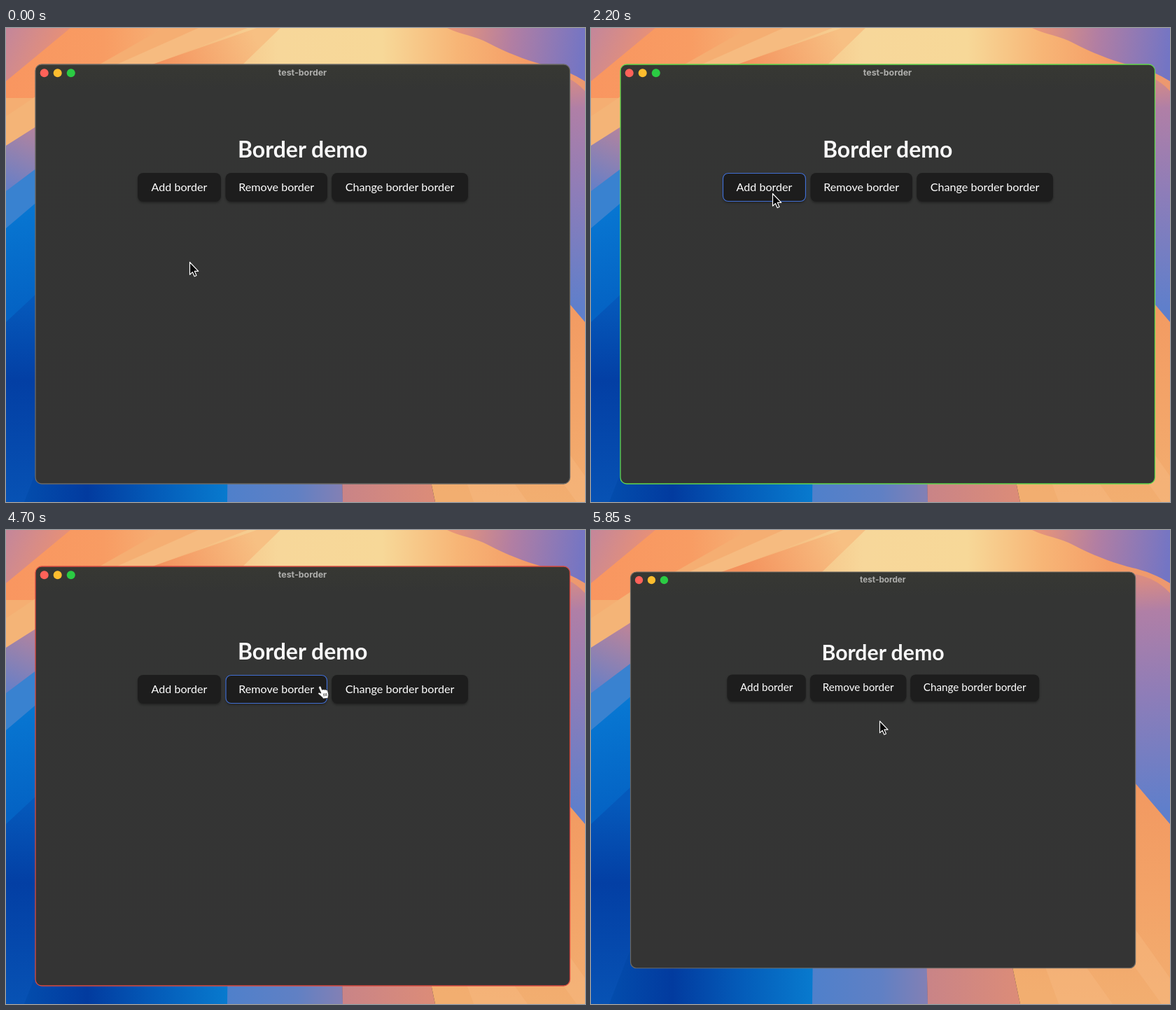
Write an HTML page that moves like this. It is 827 px wide and 677 px high and loops after 6 s.

```html
<!DOCTYPE html>
<html lang="en">
<head>
<meta charset="utf-8">
<title>Border demo</title>
<style>
  html, body { margin: 0; width: 100%; height: 100%; overflow: hidden; background: #343434; }
  svg { display: block; width: 827px; height: 677px; }
  text { fill: #fff; text-anchor: middle; }
  .title { font: 700 12.4px Inter, sans-serif; fill: #aeaeac; }
  .heading { font: 700 32px Lato, sans-serif; fill: #f9f9f9; }
  .label { font: 400 16.1px Lato, sans-serif; }
  .ring { fill: none; stroke: #426fd3; stroke-width: 1.2; }
  .shade { filter: drop-shadow(0 2px 1.5px rgba(0, 0, 0, .3)); }
</style>
</head>
<body>
<svg viewBox="0 0 827 677" xmlns="http://www.w3.org/2000/svg">
  <defs>
    <linearGradient id="sky" gradientUnits="userSpaceOnUse" x1="0" y1="0" x2="827" y2="0">
      <stop offset="0" stop-color="#f99660"/>
      <stop offset=".17" stop-color="#f89c63"/>
      <stop offset=".3" stop-color="#f5b579"/>
      <stop offset=".47" stop-color="#f7d79a"/>
      <stop offset=".65" stop-color="#f7d898"/>
      <stop offset=".78" stop-color="#f7b576"/>
      <stop offset=".9" stop-color="#f49c66"/>
      <stop offset="1" stop-color="#ec9870"/>
    </linearGradient>
    <linearGradient id="corner" gradientUnits="userSpaceOnUse" x1="0" y1="10" x2="85" y2="50">
      <stop offset="0" stop-color="#c58799"/>
      <stop offset="1" stop-color="#ee9270"/>
    </linearGradient>
    <linearGradient id="wedge" gradientUnits="userSpaceOnUse" x1="220" y1="60" x2="350" y2="0">
      <stop offset="0" stop-color="#f4925d"/>
      <stop offset="1" stop-color="#f7c083"/>
    </linearGradient>
    <linearGradient id="dusk" gradientUnits="userSpaceOnUse" x1="640" y1="0" x2="827" y2="25">
      <stop offset="0" stop-color="#e79579"/>
      <stop offset=".45" stop-color="#b17ea3"/>
      <stop offset="1" stop-color="#7375c4"/>
    </linearGradient>
    <linearGradient id="east" gradientUnits="userSpaceOnUse" x1="790" y1="70" x2="815" y2="400">
      <stop offset="0" stop-color="#d98c83"/>
      <stop offset=".14" stop-color="#b07fa6"/>
      <stop offset=".5" stop-color="#8e7db8"/>
      <stop offset="1" stop-color="#5f7fcb"/>
    </linearGradient>
    <linearGradient id="mauve" gradientUnits="userSpaceOnUse" x1="50" y1="140" x2="10" y2="230">
      <stop offset="0" stop-color="#b9849b"/>
      <stop offset="1" stop-color="#687fc6"/>
    </linearGradient>
    <linearGradient id="azure" gradientUnits="userSpaceOnUse" x1="0" y1="250" x2="30" y2="400">
      <stop offset="0" stop-color="#0878d3"/>
      <stop offset="1" stop-color="#0463c4"/>
    </linearGradient>
    <linearGradient id="deep" gradientUnits="userSpaceOnUse" x1="0" y1="390" x2="0" y2="677">
      <stop offset="0" stop-color="#0559bb"/>
      <stop offset=".4" stop-color="#033fa4"/>
      <stop offset="1" stop-color="#0752b4"/>
    </linearGradient>
    <linearGradient id="sea" gradientUnits="userSpaceOnUse" x1="30" y1="0" x2="316" y2="0">
      <stop offset="0" stop-color="#034cac"/>
      <stop offset=".3" stop-color="#023b9f"/>
      <stop offset=".65" stop-color="#045cb9"/>
      <stop offset="1" stop-color="#087ace"/>
    </linearGradient>
    <linearGradient id="iris" gradientUnits="userSpaceOnUse" x1="316" y1="0" x2="481" y2="0">
      <stop offset="0" stop-color="#4f80cb"/>
      <stop offset=".6" stop-color="#6080c4"/>
      <stop offset="1" stop-color="#8380b4"/>
    </linearGradient>
    <linearGradient id="rose" gradientUnits="userSpaceOnUse" x1="481" y1="0" x2="613" y2="0">
      <stop offset="0" stop-color="#c98487"/>
      <stop offset="1" stop-color="#dc8c78"/>
    </linearGradient>
    <linearGradient id="sand" gradientUnits="userSpaceOnUse" x1="810" y1="370" x2="780" y2="677">
      <stop offset="0" stop-color="#f29961"/>
      <stop offset=".5" stop-color="#f3a368"/>
      <stop offset="1" stop-color="#f2ae70"/>
    </linearGradient>
    <linearGradient id="face" x1="0" y1="0" x2="0" y2="1">
      <stop offset="0" stop-color="#373833"/>
      <stop offset=".06" stop-color="#343534"/>
      <stop offset="1" stop-color="#343434"/>
    </linearGradient>
  </defs>

  <g id="wallpaper">
    <rect width="827" height="200" fill="url(#sky)"/>
    <path fill="url(#corner)" d="M0 0H92L0 76Z"/>
    <path fill="#f5ae72" d="M225 0H300L120 100H0V128Z"/>
    <path fill="#f6bb80" d="M275 0H345L190 60H140Z"/>
    <path fill="url(#wedge)" d="M358 0L186 60H330L392 0Z"/>
    <path fill="#f4b477" d="M0 126L57 88V140L0 172Z"/>
    <path fill="url(#dusk)" d="M630 0C650 10 668 10 690 22C720 38 755 50 778 55Q805 62 827 76V0Z"/>
    <path fill="url(#east)" d="M770 62Q805 66 827 90V430H770Z"/>
    <path fill="url(#mauve)" d="M0 168L60 130V210L0 240Z"/>
    <path fill="#3982d0" d="M0 233L60 188V250L0 290Z"/>
    <path fill="url(#azure)" d="M0 286L60 235V400L0 430Z"/>
    <path fill="url(#deep)" d="M0 420L60 364V677H0Z"/>
    <path fill="url(#sea)" d="M56 600H317V677H26Z"/>
    <path fill="url(#iris)" d="M317 600H480L481 677H316Z"/>
    <path fill="url(#rose)" d="M479 600H597L613 677H481Z"/>
    <path fill="url(#sand)" d="M770 353L827 420V677H613L597 600H770Z"/>
    <path fill="#f5b981" opacity=".45" d="M640 600H690L745 677H668ZM770 560L827 640V677H815L770 615Z"/>
  </g>

  <g id="window">
    <rect id="frame" x="42" y="52" width="763.5" height="599" rx="9" fill="url(#face)" stroke-width="1.3"/>
    <circle cx="54.7" cy="64.2" r="6" fill="#ff6259"/>
    <circle cx="73.7" cy="64.2" r="6" fill="#fdbd2e"/>
    <circle cx="92.8" cy="64.2" r="6" fill="#2bcb43"/>
    <text class="title" x="423.5" y="68.2">test-border</text>
    <text class="heading" x="423.7" y="185">Border demo</text>
    <g id="buttons"></g>
    <g id="cursor">
      <path id="arrow" fill="#050505" stroke="#fff" stroke-width="1.2" stroke-linejoin="round"
        d="M.5 .5V18.2L4.4 14.6L7.2 20.8L10 19.5L7.3 13.3H12.8Z"/>
      <g id="hand" transform="translate(-3 -2)" stroke="#222" stroke-width=".8" stroke-linejoin="round">
        <path fill="#fff" d="M2.2 1.5C3.2 .6 4.6 1.2 5 2.4L6.6 6.4C7.4 5.4 8.8 5.4 9.4 6.3C10.3 5.5 11.6 5.7 12.1 6.6C13 6.1 14.3 6.6 14.6 7.8L15.6 12C16 14 15.2 15.4 14.9 18.3L7.8 19C7.4 16.8 4 14.6 1.4 12.6C.2 11.6 1 10 2.6 10.2L5 11.2L1.7 3.4Z"/>
        <path fill="none" d="M8.3 11.5L9.2 15.5M10.5 11.2L11.2 15.2M12.6 11L13.1 15"/>
      </g>
    </g>
  </g>
</svg>
<script>
const LOOP = 6000, FADE = 250;
const $ = id => document.getElementById(id);

// label, left, width, hover start, hover end
const buttons = [
  ["Add border", 188, 119, 700, 2250],
  ["Remove border", 313.5, 145.5, 4350, 5320],
  ["Change border border", 465.2, 194.8, 2950, 4400]
];

// time, x, y, pointing hand
const path = [
  [0, 262, 334, 0], [300, 262, 334, 0], [800, 241, 236, 1], [1300, 237, 229, 1],
  [1900, 237, 229, 1], [2200, 259, 236, 0], [2500, 330, 260, 0], [2800, 440, 256, 0],
  [3050, 485, 222, 1], [3500, 485, 220, 1], [4150, 485, 220, 1], [4700, 448, 224, 1],
  [5050, 438, 228, 1], [5300, 430, 244, 0], [5500, 424, 254, 0], [5850, 418.4, 277, 0],
  [6000, 418.4, 277, 0]
];

const outline = [[5100, "#6b6965"], [3200, "#d94b42"], [1000, "#62d84c"], [0, "#6b6965"]];

$("buttons").innerHTML = buttons.map(([label, x, w]) => `
  <rect class="shade" x="${x}" y="207" width="${w}" height="41" rx="8" fill="#1d1d1d"/>
  <rect class="ring" x="${x + .5}" y="207.5" width="${w - 1}" height="40" rx="7.5"/>
  <text class="label" x="${x + w / 2}" y="232.5">${label}</text>`).join("");
const rings = document.querySelectorAll(".ring");

const clamp = v => Math.max(0, Math.min(1, v));
const smooth = v => v * v * (3 - 2 * v);

function cursorAt(t) {
  const i = path.findIndex(p => p[0] > t);
  const a = path[i - 1], b = path[i];
  const k = smooth((t - a[0]) / (b[0] - a[0]));
  return [a[1] + (b[1] - a[1]) * k, a[2] + (b[2] - a[2]) * k, a[3]];
}

function draw(t) {
  const zoom = t < 5700 ? 0 : t < 5850 ? .4 : 1;
  $("window").setAttribute("transform",
    `translate(${42 + 14.5 * zoom} ${52 + 8 * zoom}) scale(${1 - .0555 * zoom}) translate(-42 -52)`);
  $("frame").setAttribute("stroke", outline.find(o => t >= o[0])[1]);
  buttons.forEach(([, , , from, to], i) => {
    rings[i].style.opacity = Math.min(clamp((t - from) / FADE), clamp(1 - (t - to) / FADE));
  });
  const [x, y, pointing] = cursorAt(t);
  $("cursor").setAttribute("transform", `translate(${x} ${y})`);
  $("hand").style.display = pointing ? "" : "none";
  $("arrow").style.display = pointing ? "none" : "";
}

function tick() {
  const t = performance.now() % LOOP;
  draw(t >= 5850 ? 5850 : t >= 5700 ? 5700 : Math.floor(t / 100) * 100);
  requestAnimationFrame(tick);
}
tick();
</script>
</body>
</html>
```
